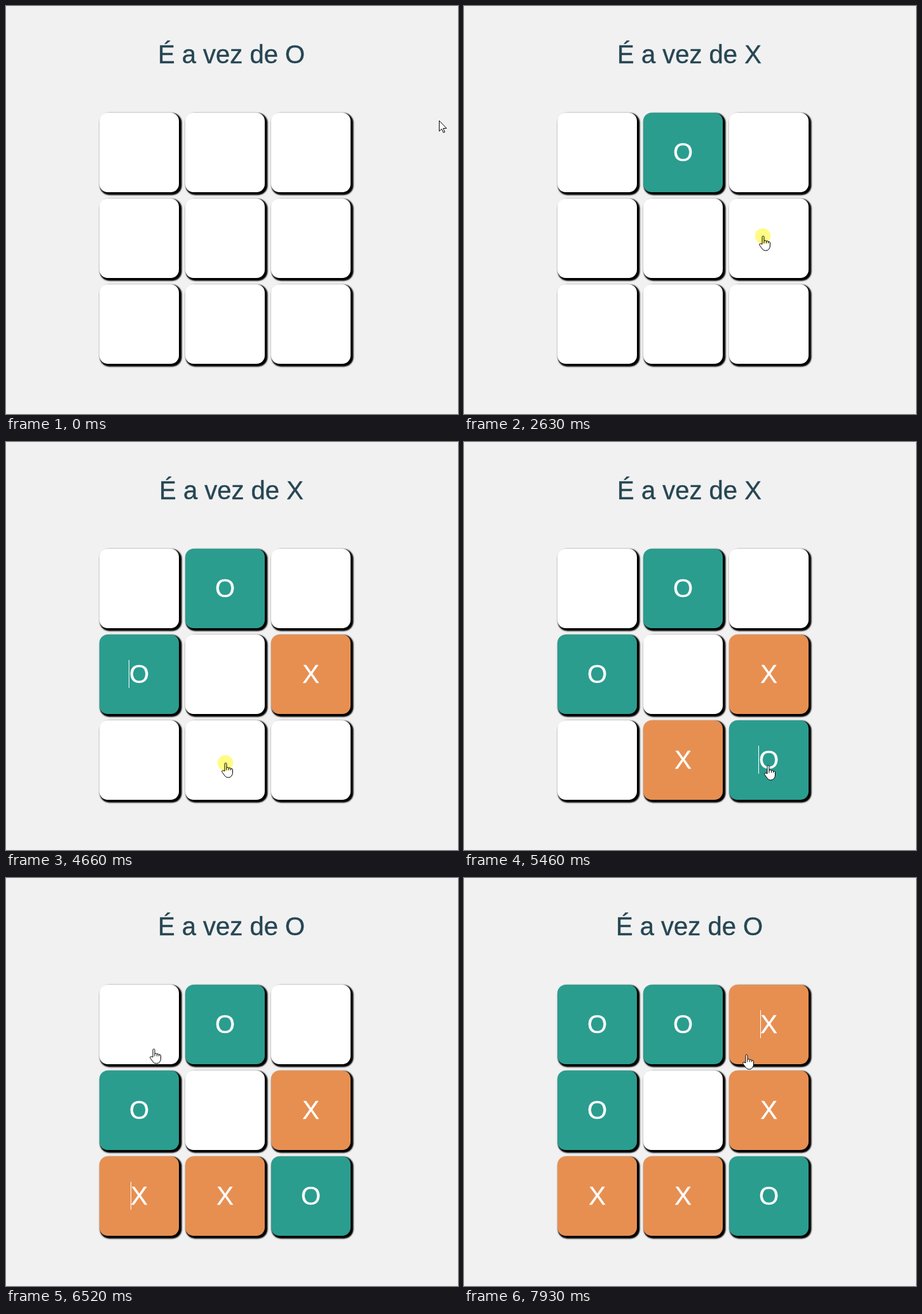
An HTML page for the animation above (8000 ms loop, 711 by 642 pixels).

```html
<!DOCTYPE html>
<html lang="pt">
<head>
<meta charset="utf-8">
<title>Jogo da velha</title>
<style>
html, body { margin: 0; width: 711px; height: 642px; overflow: hidden; background: #f1f1f1; }
body {
  position: relative; text-align: center; cursor: default;
  font: 40px/44px "Liberation Sans", Arial, sans-serif; -webkit-text-stroke: .4px;
}
h1 { position: absolute; left: 0; top: 54px; width: 709px; margin: 0; font: inherit; color: #264653; }
.cell {
  position: absolute; width: 125px; height: 85px; padding-top: 40px;
  border-radius: 13px; background: #fff; color: #fff;
  box-shadow: 2.5px 2.5px 2px 2px #000;
}
.O { background: #2a9d8f; }
.X { background: #e78f51; }
.cell span { position: relative; display: inline-block; height: 44px; }
.caret span::before { content: ""; position: absolute; left: -.5px; top: 0; width: 1px; height: 44px; background: #fff; }
svg { position: absolute; left: 0; top: 0; overflow: visible; }
#spot { mix-blend-mode: multiply; }
</style>
</head>
<body>
<h1></h1>
<svg width="711" height="642" fill="#fff" stroke="#000" stroke-linejoin="round">
  <path id="arrow" d="M.5 .5V17L4.5 13.5L7 19.2L9.2 18.3L6.8 12.5H12Z"/>
  <path id="hand" d="M-1 13V1.5a1.5 1.5 0 0 1 3 0V7.5Q5 6 5.5 8Q8 6.8 8.5 9Q11.5 8 11.5 11V15Q11.5 18 10 20Q8.5 23 4.5 23Q1 23 -1 20L-5 14.5Q-6 12.5 -4.5 12T-1 13ZM2 7.5V11.5M5.5 8V11.5M8.5 9V11.5"/>
</svg>
<svg id="spot" width="711" height="642"><circle r="12.3" fill="#fffb84"/></svg>
<script>
const LOOP = 8000, SIZE = 125, PITCH = 135, LEFT = 147, TOP = 168;

// Each play: the pointer sets off, then marks the cell under its goal
const plays = [
  { go: 870, mark: 1760, x: 355, y: 241, bow: 58 },
  { go: 2160, mark: 2690, x: 470, y: 362 },
  { go: 3060, mark: 3640, x: 247, y: 369 },
  { go: 4190, mark: 4720, x: 345, y: 505 },
  { go: 4800, mark: 5460, x: 478, y: 509 },
  { go: 5560, mark: 6060, x: 238, y: 490 },
  { go: 6170, mark: 6790, x: 231, y: 236 },
  { go: 7030, mark: 7530, x: 465, y: 234 },
  { go: 7780, mark: LOOP, x: 402, y: 363 }
];

const $ = s => document.querySelector(s);
const title = $('h1'), arrow = $('#arrow'), hand = $('#hand'), spot = $('#spot circle');
const cells = [...Array(9).keys()].map(i => {
  const cell = document.createElement('div');
  cell.style.left = LEFT + i % 3 * PITCH + 'px';
  cell.style.top = TOP + Math.floor(i / 3) * PITCH + 'px';
  cell.append(document.createElement('span'));
  $('svg').before(cell);
  return cell;
});

const show = (el, on) => el.setAttribute('visibility', on ? 'visible' : 'hidden');
const index = (v, start) => Math.floor((v - start) / PITCH);
const cellAt = ({ x, y }) => index(x, LEFT) + 3 * index(y, TOP);
const inside = v => v >= 0 && v < 2 * PITCH + SIZE && v % PITCH < SIZE;

function pointer(t) {
  let x = 681, y = 180;
  for (const { go, x: toX, y: toY, bow = 0 } of plays) {
    if (t < go) break;
    const dx = toX - x, dy = toY - y;
    const p = Math.min(1, (t - go) / (300 + .6 * Math.hypot(dx, dy)));
    const u = p * p * (3 - 2 * p);
    x += dx * u;
    y += dy * u + 4 * bow * u * (1 - u);
  }
  return [Math.round(x), Math.round(y)];
}

function draw(t) {
  const done = plays.filter(play => t >= play.mark);
  title.textContent = 'É a vez de ' + 'OX'[done.length % 2];

  cells.forEach((cell, i) => {
    const n = done.findIndex(play => cellAt(play) === i);
    const mark = n < 0 ? '' : 'OX'[n % 2];
    const focused = n >= 0 && n === done.length - 1;
    const caret = focused && (t - done[n].mark + 60) % 1060 < 530;
    cell.className = `cell ${mark} ${caret ? 'caret' : ''}`;
    cell.firstChild.textContent = mark;
  });

  const [x, y] = pointer(t);
  const overCell = inside(x - LEFT) && inside(y - TOP);
  for (const el of [arrow, hand, spot]) el.setAttribute('transform', `translate(${x} ${y})`);
  show(hand, overCell);
  show(arrow, !overCell);
  show(spot, plays.some(({ mark }) => mark < LOOP && t >= mark - 70 && t < mark));
}

const begin = performance.now();
function tick() {
  draw((performance.now() - begin) % LOOP);
  requestAnimationFrame(tick);
}
tick();
</script>
</body>
</html>
```
